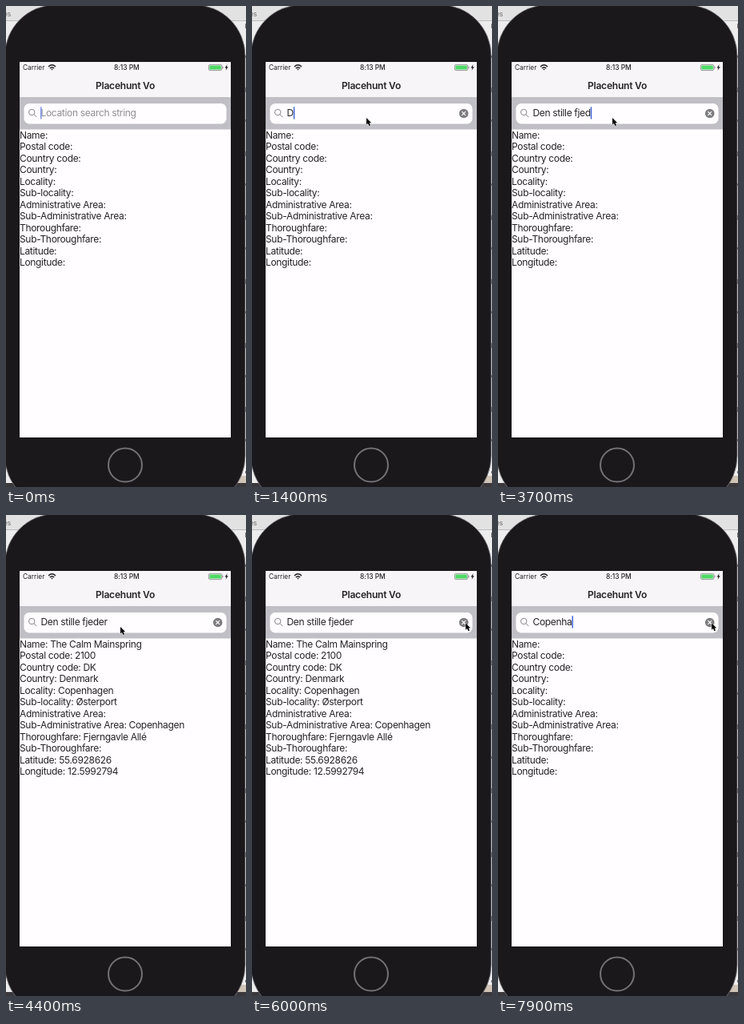
Animation, 300 px wide and 602 px high, one loop 8 s. Source, as an HTML page:

```html
<!DOCTYPE html>
<html lang="en">
<head>
<meta charset="utf-8">
<title>Place search</title>
<style>
  html, body { margin: 0; width: 100%; height: 100%; overflow: hidden; background: #e9e9e9; }
  svg { display: block; width: 100vw; height: 100vh; }
  text { font-family: Inter, "Liberation Sans", sans-serif; font-size: 12px; letter-spacing: -.33px; fill: #242225; white-space: pre; }
  .small { font-size: 8.4px; letter-spacing: -.02px; }
  .title { font-weight: 600; letter-spacing: -.2px; text-anchor: middle; }
</style>
</head>
<body>
<svg viewBox="0 0 300 602">
  <!-- desktop behind the phone -->
  <rect width="300" height="602" fill="#eeedee"/>
  <rect width="300" height="18" fill="#e3e2e3"/>
  <path d="M0 18.5H300" stroke="#bcbbbd"/>
  <text class="small" x="-3" y="13" style="fill:#666">es</text>
  <rect y="597" width="300" height="5" fill="#3b393c"/>
  <rect x="285" y="588" width="15" height="9" fill="#d0c5b6"/>
  <path d="M299.5 22V585" stroke="#77757a" stroke-dasharray="6 34 3 37"/>

  <!-- phone -->
  <rect x="-1.5" y="-1.5" width="300.5" height="628.5" rx="64" fill="#1a181b" stroke="#77757a" stroke-width=".8"/>
  <circle cx="149" cy="574.5" r="21" fill="none" stroke="#737174" stroke-width="2"/>
  <rect x="17" y="70" width="264" height="470" fill="#fffdff"/>
  <rect x="17" y="70" width="264" height="45" fill="#f7f5f7"/>
  <rect x="17" y="114.5" width="264" height="40" fill="#c0bfc6"/>
  <path d="M17 114.7H281" stroke="#b4b3b8" stroke-width=".8"/>

  <!-- status bar -->
  <text class="small" x="21" y="80">Carrier</text>
  <g fill="none" stroke="#1c1a1d" stroke-width="1.4">
    <path d="M53 76Q57.5 71.6 62 76M54.8 78Q57.5 75.3 60.2 78"/>
    <path d="M56.3 79L57.5 80.4L58.7 79Q57.5 78 56.3 79Z" fill="#1c1a1d" stroke="none"/>
  </g>
  <text class="small" x="150.8" y="80" text-anchor="middle" font-weight="500">8:13 PM</text>
  <rect x="253.4" y="73.4" width="16.4" height="7.2" rx="1.6" fill="none" stroke="#858387" stroke-width=".8"/>
  <rect x="254.4" y="74.4" width="14.4" height="5.2" rx=".7" fill="#4cd964"/>
  <path d="M270.9 75.7V78.3" stroke="#858387"/>
  <path d="M276.6 73L273.6 77.4H275.4L274.6 80.8L277.7 76.3H275.9Z" fill="#1c1a1d"/>
  <text class="title" x="149" y="103.7">Placehunt Vo</text>

  <!-- search field -->
  <rect x="22.5" y="122" width="253" height="25.5" rx="6.5" fill="#fffdff"/>
  <g fill="none" stroke="#858489" stroke-width="1">
    <circle cx="32.2" cy="133" r="3.7"/>
    <path d="M34.9 135.7L38.4 139.2"/>
  </g>
  <text id="query" x="43.5" y="138.3"></text>
  <rect id="caret" y="126.3" width="1.5" height="15.2" fill="#3f63d8"/>
  <g id="clear">
    <circle cx="264.7" cy="134.5" r="5.8" fill="#7d7c80"/>
    <path d="M262.4 132.2L267 136.8M267 132.2L262.4 136.8" stroke="#fff" stroke-width="1.2"/>
  </g>
  <g id="rows"></g>
  <path id="mouse" d="M0 0V8.6L1.9 6.8L3.4 10L5 9.3L3.6 6.3H6.2Z" fill="#000" stroke="#fff" stroke-width=".8" paint-order="stroke"/>
</svg>
<script>
const LOOP = 8000, TICK = 100, LEFT = 43.5;
const $ = id => document.getElementById(id);
const query = $('query'), caret = $('caret'), clear = $('clear'), mouse = $('mouse');

const fields = [
  ['Name', 'The Calm Mainspring'], ['Postal code', '2100'], ['Country code', 'DK'],
  ['Country', 'Denmark'], ['Locality', 'Copenhagen'], ['Sub-locality', 'Østerport'],
  ['Administrative Area', ''], ['Sub-Administrative Area', 'Copenhagen'],
  ['Thoroughfare', 'Fjerngavle Allé'], ['Sub-Thoroughfare', ''],
  ['Latitude', '55.6928626'], ['Longitude', '12.5992794']
];
const rows = fields.map((field, i) => {
  const row = document.createElementNS('http://www.w3.org/2000/svg', 'text');
  row.setAttribute('x', 17);
  row.setAttribute('y', 165.75 + 14.48 * i);
  $('rows').append(row);
  return row;
});

// One time per key press, in units of 100 ms
const first = { text: 'Den stille fjeder', keys: [14, 16, 17, 18, 21, 23, 25, 27, 28, 28, 30, 31, 34, 36, 37, 38, 39] };
const second = { text: 'Copenhagen', keys: [71, 73, 74, 75, 76, 78, 79] };
const typed = ({ text, keys }, t) => text.slice(0, keys.filter(k => k * TICK <= t).length);

const clamp = v => Math.max(0, Math.min(1, v));
const easeOut = p => 1 - (1 - p) ** 2;
const bezier = (a, b, c, p) => a.map((v, i) => v * (1 - p) ** 2 + 2 * b[i] * p * (1 - p) + c[i] * p * p);

function mouseAt(t) {
  if (t < 4800) return bezier([306, 200], [215, 150], [143, 140], easeOut(clamp((t - 300) / 800)));
  if (t < 5600) return bezier([143, 140], [200, 118], [280, 140], easeOut(clamp((t - 4700) / 400)));
  return bezier([280, 140], [273, 138], [267, 135.2], clamp((t - 5500) / 500));
}

function caretOpacity(t, text) {
  if (text) return t >= 4100 && t < 6300 ? 0 : 1;
  const phase = t < 6300 ? t : t - 6900;
  if (phase >= 100 && phase < 500 || phase >= 1100) return 0;
  return phase >= 0 && phase < 100 || phase >= 500 && phase < 600 || phase >= 1000 ? .7 : 1;
}

function draw(now) {
  const t = Math.floor(now % LOOP / TICK) * TICK;
  const text = t < 6300 ? typed(first, t) : typed(second, t);
  const found = t >= 4400 && t < 6300;

  query.textContent = text || 'Location search string';
  query.style.fill = text ? '#242225' : '#8e8d92';
  caret.setAttribute('x', text ? LEFT + query.getComputedTextLength() : 43);
  caret.setAttribute('opacity', caretOpacity(t, text));
  clear.setAttribute('visibility', text ? 'visible' : 'hidden');
  rows.forEach((row, i) => {
    const [label, value] = fields[i];
    row.textContent = `${label}: ${found ? value : ''}`;
  });
  mouse.setAttribute('visibility', t < 400 ? 'hidden' : 'visible');
  mouse.setAttribute('transform', `translate(${mouseAt(t)})`);
}

const start = performance.now();
function frame() {
  draw(performance.now() - start);
  requestAnimationFrame(frame);
}
frame();
</script>
</body>
</html>
```
